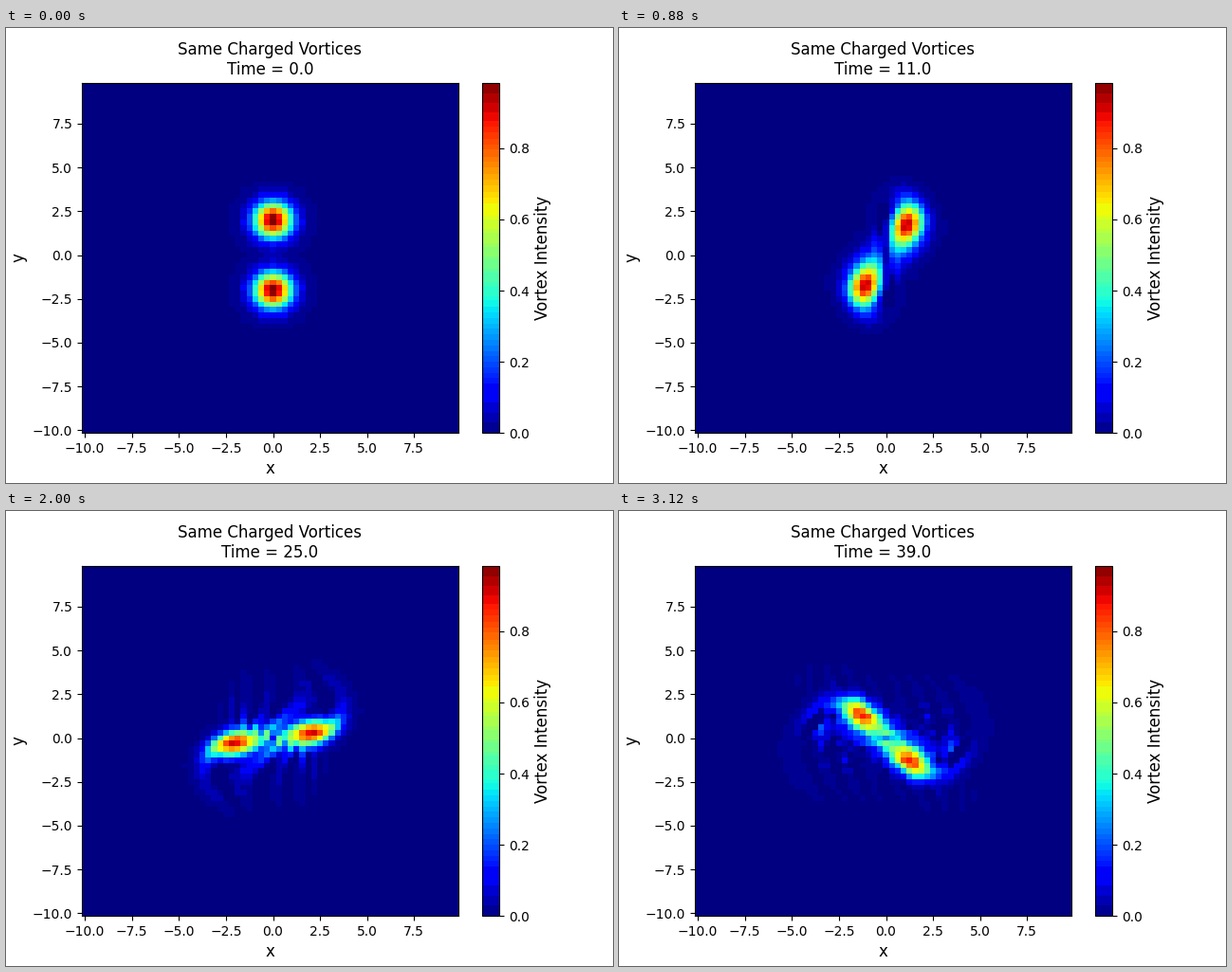
Recreate the animation shown at these times as a matplotlib script. Size 640 by 480 pixels, loop 3.2 s.

```python
import numpy as np
import matplotlib.pyplot as plt
from matplotlib.animation import FuncAnimation
from matplotlib.colors import ListedColormap

L, N, NU = 20, 64, 0.001
FRAMES, STEPS = 40, 20          # one time unit per frame
DT = 1 / STEPS

h = L / N
grid = np.arange(N) * h - L / 2
X, Y = np.meshgrid(grid, grid)

k = 2 * np.pi * np.fft.fftfreq(N, h)
KX, KY = np.meshgrid(k, k)
K2 = KX**2 + KY**2
K2[0, 0] = 1


def d(f, axis):
    """Periodic central difference."""
    return (np.roll(f, -1, axis) - np.roll(f, 1, axis)) / (2 * h)


def laplacian(f):
    total = sum(np.roll(f, s, a) for s in (-1, 1) for a in (0, 1))
    return (total - 4 * f) / h**2


def rhs(w):
    """Vorticity advected by its stream function, with slight diffusion."""
    w_hat = np.fft.fft2(w)
    w_hat[0, 0] = 0
    psi = np.fft.ifft2(-w_hat / K2).real
    return d(psi, 1) * d(w, 0) - d(psi, 0) * d(w, 1) + NU * laplacian(w)


def rk4(w):
    a = rhs(w)
    b = rhs(w + DT / 2 * a)
    c = rhs(w + DT / 2 * b)
    e = rhs(w + DT * c)
    return w + DT / 6 * (a + 2 * b + 2 * c + e)


def simulate():
    w = np.exp(-X**2 - (Y - 2)**2) + np.exp(-X**2 - (Y + 2)**2)
    states = [w]
    for _ in range(FRAMES - 1):
        for _ in range(STEPS):
            w = rk4(w)
        states.append(w)
    return states


def banded_jet():
    """Jet colours merged into coarse RGB bins."""
    rgb = plt.get_cmap("jet")(np.arange(256))[:, :3]
    keys = (rgb * 255).astype(int) // [32, 16, 32]
    out = rgb.copy()
    for key in np.unique(keys, axis=0):
        same = (keys == key).all(axis=1)
        out[same] = rgb[0] if same[0] else rgb[same].mean(axis=0)
    return ListedColormap(out)


states = simulate()

fig, ax = plt.subplots(figsize=(6.4, 4.8), dpi=100)
mesh = ax.pcolormesh(X, Y, states[0], cmap=banded_jet(), shading="nearest",
                     vmin=0, vmax=states[0].max())
bar = fig.colorbar(mesh, ax=ax)
bar.set_label("Vortex Intensity", fontsize=12)
ax.set_xlabel("x", fontsize=12)
ax.set_ylabel("y", fontsize=12)
title = ax.set_title("")


def update(i):
    mesh.set_array(states[i])
    title.set_text(f"Same Charged Vortices\nTime = {i:.1f}")
    return mesh, title


update(0)
anim = FuncAnimation(fig, update, frames=FRAMES, interval=80, repeat=True)
plt.show()
```
